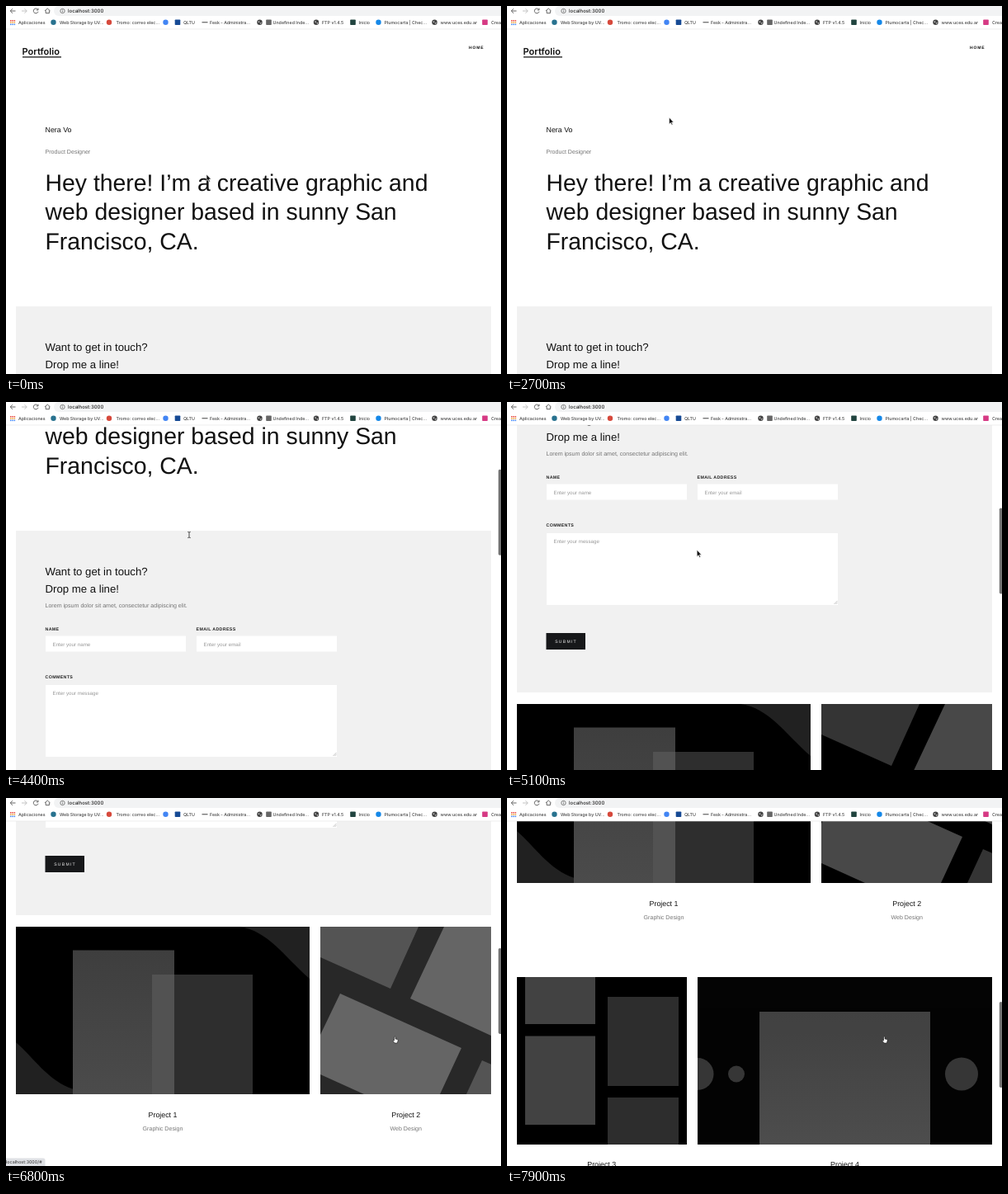
An HTML page that plays this animation: 600x446 px, repeating every 8000 ms.

```html
<!DOCTYPE html>
<html lang="en">
<head>
<meta charset="utf-8">
<title>Portfolio</title>
<style>
  html, body { margin: 0; width: 100%; height: 100%; overflow: hidden; background: #fff; }
  svg { display: block; width: 600px; height: 446px; text-rendering: geometricPrecision; }
  text { font-family: "Liberation Sans", Arial, sans-serif; fill: #111; white-space: pre; }
  .hero { font-size: 28.4px; }
  .lead { font-size: 13.2px; }
  .name { font-size: 8.85px; }
  .small { font-size: 7.08px; fill: #757575; }
  .label { font-size: 5.3px; letter-spacing: .35px; fill: #222; font-weight: bold; }
  .hint { font-size: 6.2px; fill: #999; }
  .mid { text-anchor: middle; }
  .logo { font: 600 11.1px Inter, sans-serif; }
  .nav { font-size: 5px; font-weight: bold; letter-spacing: .9px; }
  .button { font-size: 5.1px; letter-spacing: 1.25px; fill: #eee; }
  .ui text { font: 500 5.3px Inter, sans-serif; fill: #444; }
  .ui .address { font-size: 6px; fill: #222; }
  .icon { fill: none; stroke: #555; stroke-width: .9; }
</style>
</head>
<body>
<svg viewBox="0 0 600 446">
  <defs>
    <linearGradient id="card" x2="0" y2="1">
      <stop stop-color="#3e3e3e"/><stop offset="1" stop-color="#4b4b4b"/>
    </linearGradient>
    <clipPath id="clip2"><path d="M381 758h207v203h-207z"/></clipPath>
    <clipPath id="clip4"><path d="M231 1075h357v203h-357z"/></clipPath>
  </defs>
  <rect width="600" height="446" fill="#fff"/>

  <g id="page">
    <text class="logo" x="19.5" y="59">Portfolio</text>
    <path d="M20 61.8h47" stroke="#111" stroke-width="1.2"/>
    <text class="nav" x="561" y="51.6">HOME</text>
    <text class="name" x="47.5" y="152.5">Nera Vo</text>
    <text class="small" x="47.5" y="179">Product Designer</text>
    <g class="hero">
      <text x="47.5" y="224">Hey there! I’m a creative graphic and</text>
      <text x="47.5" y="259.4">web designer based in sunny San</text>
      <text x="47.5" y="294.8">Francisco, CA.</text>
    </g>

    <rect x="12" y="364" width="576" height="380" fill="#f1f1f1"/>
    <g class="lead">
      <text x="47.5" y="418">Want to get in touch?</text>
      <text x="47.5" y="438.6">Drop me a line!</text>
    </g>
    <text class="small" x="47.5" y="456.6">Lorem ipsum dolor sit amet, consectetur adipiscing elit.</text>
    <text class="label" x="47.5" y="484.5">NAME</text>
    <text class="label" x="230.5" y="484.5">EMAIL ADDRESS</text>
    <text class="label" x="47.5" y="543">COMMENTS</text>
    <path fill="#fff" d="M48 491.5h170v19H48zM231 491.5h170v19H231zM48 551h353v87H48z"/>
    <path stroke="#888" stroke-width=".5" d="M396.500 637l4-4M398.500 637l2-2"/>
    <text class="hint" x="56.500" y="503.600">Enter your name</text>
    <text class="hint" x="239.500" y="503.600">Enter your email</text>
    <text class="hint" x="56.500" y="563.400">Enter your message</text>
    <rect x="47.500" y="672" width="47.500" height="20" fill="#17181a"/>
    <text class="button" x="58.200" y="683.600">SUBMIT</text>

    <g>
      <rect x="12" y="758" width="356" height="203"/>
      <path fill="#212121" d="M283 758C318 763 337 794 368 821V758zM12 898C34 917 51 945 82 955V961H12z"/>
      <rect x="81" y="786.500" width="123" height="174.500" fill="url(#card)"/>
      <rect x="177" y="816" width="122" height="145" fill="#2e2e2e"/>
      <rect x="177" y="816" width="27" height="145" fill="#525252"/>
    </g>
    <g id="project2" clip-path="url(#clip2)">
      <rect x="381" y="758" width="207" height="203"/>
      <path fill="#343434" d="M381 758H500L466 833L381 795zM577 920L600 930V961H558z"/>
      <path fill="#484848" d="M531 758L490 845L588 890V758zM405 839L552 905L526 961H434L381 937V889z"/>
    </g>
    <g>
      <rect x="12" y="1075" width="206" height="203"/>
      <path fill="#424242" d="M22 1075h85v57H22zM22 1146.500h85v107.500H22z"/>
      <path fill="#2d2d2d" d="M122 1099h86v108h-86zM122 1221h86v57h-86z"/>
    </g>
    <g id="project4" clip-path="url(#clip4)">
      <rect x="231" y="1075" width="357" height="203"/>
      <rect x="306" y="1117" width="207" height="161" fill="url(#card)"/>
      <g fill="#333">
        <circle cx="231" cy="1192.500" r="19.500"/>
        <circle cx="278" cy="1192.500" r="10"/>
        <circle cx="551" cy="1192.500" r="20"/>
      </g>
    </g>
    <g class="mid">
      <text class="name" x="190" y="989">Project 1</text>
      <text class="name" x="484.700" y="989">Project 2</text>
      <text class="small" x="190" y="1004.500">Graphic Design</text>
      <text class="small" x="484.700" y="1004.500">Web Design</text>
      <text class="name" x="114.700" y="1305">Project 3</text>
      <text class="name" x="409.500" y="1305">Project 4</text>
    </g>
  </g>

  <rect id="thumb" x="596.800" width="3.600" height="104" rx="1.800" fill="#747474"/>

  <g id="status" class="ui">
    <path d="M0 436.500h45q2.500 0 2.500 2.500v7H0z" fill="#dfe1e5"/>
    <text x="0" y="443.200">localhost:3000/#</text>
  </g>

  <g id="chrome" class="ui">
    <rect width="600" height="28" fill="#fff"/>
    <path d="M600 0H64a6 6 0 0 0 0 12H600z" fill="#f2f3f4"/>
    <path d="M0 28h600" stroke="#e3e3e3" stroke-width=".6"/>
    <g class="icon">
      <path d="M11.500 6H5.500M8 3.200L5.200 6L8 8.800"/>
      <path d="M19 6h6M22.500 3.200L25.300 6L22.500 8.800" stroke="#bbb"/>
      <path d="M38.600 4.300A2.900 2.900 0 1 0 39 6.800M39 2.700v2.200h-2.200"/>
      <path d="M47 6L50.300 3L53.600 6M48.200 5.500V8.700h4.200V5.500"/>
      <circle cx="68.500" cy="6" r="2.700" stroke-width=".7"/>
      <path d="M68.500 5.500v2M68.500 4.200v.7" stroke-width=".7"/>
    </g>
    <text class="address" x="75" y="8.200">localhost:3000</text>
  </g>

  <g id="cursor">
    <path id="arrow" d="M0 0V8.200L1.900 6.500L3.200 9.200L4.500 8.600L3.200 6H5.600z" fill="#111" stroke="#fff" stroke-width=".6"/>
    <path id="beam" d="M-1.700 -3.600Q0 -3.600 0 -2.600Q0 -3.600 1.700 -3.600M0 -2.600V2.600M-1.700 3.600Q0 3.600 0 2.600Q0 3.600 1.700 3.600" fill="none" stroke="#222" stroke-width=".8"/>
    <path id="hand" d="M-1.500 -3.500q.8-.9 1.500 0V-1L2.700 -.4Q3.300 0 3 1.600L2.300 4H-1L-3 1.200Q-3 .2 -1.500 1z" fill="#fff" stroke="#111" stroke-width=".6"/>
  </g>
</svg>
<script>
const LOOP = 8000, STEP = 100;
const $ = id => document.getElementById(id);

// Rows: [time, value, ...]
const scroll = [[0, 0], [3600, 0], [3900, 55], [4400, 208], [5000, 365], [5500, 498], [5700, 513],
  [6100, 513], [6700, 602], [6900, 602], [7200, 670], [7500, 735], [7900, 858]];
const pointer = [[0, 243, 204], [400, 243, 204], [1300, 212, 170], [2200, 176, 108], [2700, 196.5, 135],
  [3300, 222, 161], [4600, 222, 161], [5700, 240, 201], [6200, 240, 201], [6700, 472, 293],
  [7200, 472, 293], [7500, 470.500, 289], [7900, 458, 293]];
const hover2 = [[6600, 0], [6800, 1], [7200, 1], [7400, 0]];
const hover4 = [[7800, 0], [8000, .2]];
const statusFade = [[6600, 0], [6700, 1], [7400, 1], [7500, .6], [7600, 0]];
const shapes = [[0, "arrow"], [3200, "beam"], [5000, "arrow"], [6600, "hand"], [7300, "arrow"], [7700, "hand"]];

function at(rows, t) {
  const i = rows.findIndex(row => row[0] > t);
  if (i === 0) return rows[0].slice(1);
  if (i < 0) return rows.at(-1).slice(1);
  const a = rows[i - 1], b = rows[i], k = (t - a[0]) / (b[0] - a[0]);
  return a.slice(1).map((v, n) => v + (b[n + 1] - v) * k);
}

function add(parent, tag, attrs, text = "") {
  const el = document.createElementNS("http://www.w3.org/2000/svg", tag);
  for (const key in attrs) el.setAttribute(key, attrs[key]);
  el.textContent = text;
  parent.append(el);
  return el;
}

// Bookmarks: icon kind, icon x, colour, label x, label
const bookmarks = [
  ["dot", 57.500, "#28728f", 65, "Web Storage by UV..."],
  ["dot", 125, "#d6493c", 133.500, "Tromo: correo elec..."],
  ["dot", 193.500, "#4285f4"],
  ["square", 208, "#164a94", 215, "QLTU"],
  ["dash", 241, "#777", 247, "Fesk - Administra..."],
  ["globe", 307.500, "#444"],
  ["square", 318.500, "#666", 323.500, "Undefined Inde..."],
  ["globe", 376, "#444", 383, "FTP v1.4.5"],
  ["square", 420.500, "#21443f", 427.500, "Inicio"],
  ["dot", 451.500, "#1588e8", 458.500, "Plumocarta | Chec..."],
  ["globe", 519.500, "#444", 526.500, "www.uces.edu.ar"],
  ["square", 580.500, "#d63a84", 588, "Crea"]
];
const chrome = $("chrome");
for (let i = 0; i < 9; i++) {
  add(chrome, "rect", { x: 5 + i % 3 * 2.300, y: 17 + Math.floor(i / 3) * 2.300, width: 1.500, height: 1.500,
    fill: ["#e8453c", "#f0a53a", "#4285f4"][Math.floor(i / 3)] });
}
add(chrome, "text", { x: 15, y: 22 }, "Aplicaciones");
for (const [kind, x, fill, labelX, label] of bookmarks) {
  if (kind === "square") add(chrome, "rect", { x: x - 3.300, y: 16.500, width: 6.600, height: 6.600, rx: .8, fill });
  else if (kind === "dash") add(chrome, "rect", { x: x - 3.500, y: 19, width: 7, height: 1.400, fill });
  else add(chrome, "circle", { cx: x, cy: 19.800, r: 3.200, fill });
  if (kind === "globe") add(chrome, "path", { d: `M${x - 2} 18.500l2 .2l-.8 1.500zM${x + .6} 20.500l1.600-.6l-1 2z`, fill: "#fff" });
  if (label) add(chrome, "text", { x: labelX, y: 22 }, label);
}

function draw(t) {
  const [y] = at(scroll, t), [px, py] = at(pointer, t);
  $("page").setAttribute("transform", `translate(0 ${-Math.round(y)})`);
  $("thumb").setAttribute("y", 29 + y * .254);
  $("thumb").style.opacity = t > 3600 ? 1 : 0;
  $("project2").style.opacity = 1 - .16 * at(hover2, t)[0];
  $("project4").style.opacity = 1 - .16 * at(hover4, t)[0];
  $("status").style.opacity = at(statusFade, t)[0];
  $("cursor").setAttribute("transform", `translate(${px} ${py})`);
  const shape = shapes.findLast(row => row[0] <= t)[1];
  for (const id of ["arrow", "beam", "hand"]) $(id).style.display = id === shape ? "" : "none";
}

const start = performance.now();
function tick() {
  const t = (performance.now() - start) % LOOP;
  draw(Math.floor(t / STEP) * STEP);
  requestAnimationFrame(tick);
}
tick();
</script>
</body>
</html>
```
